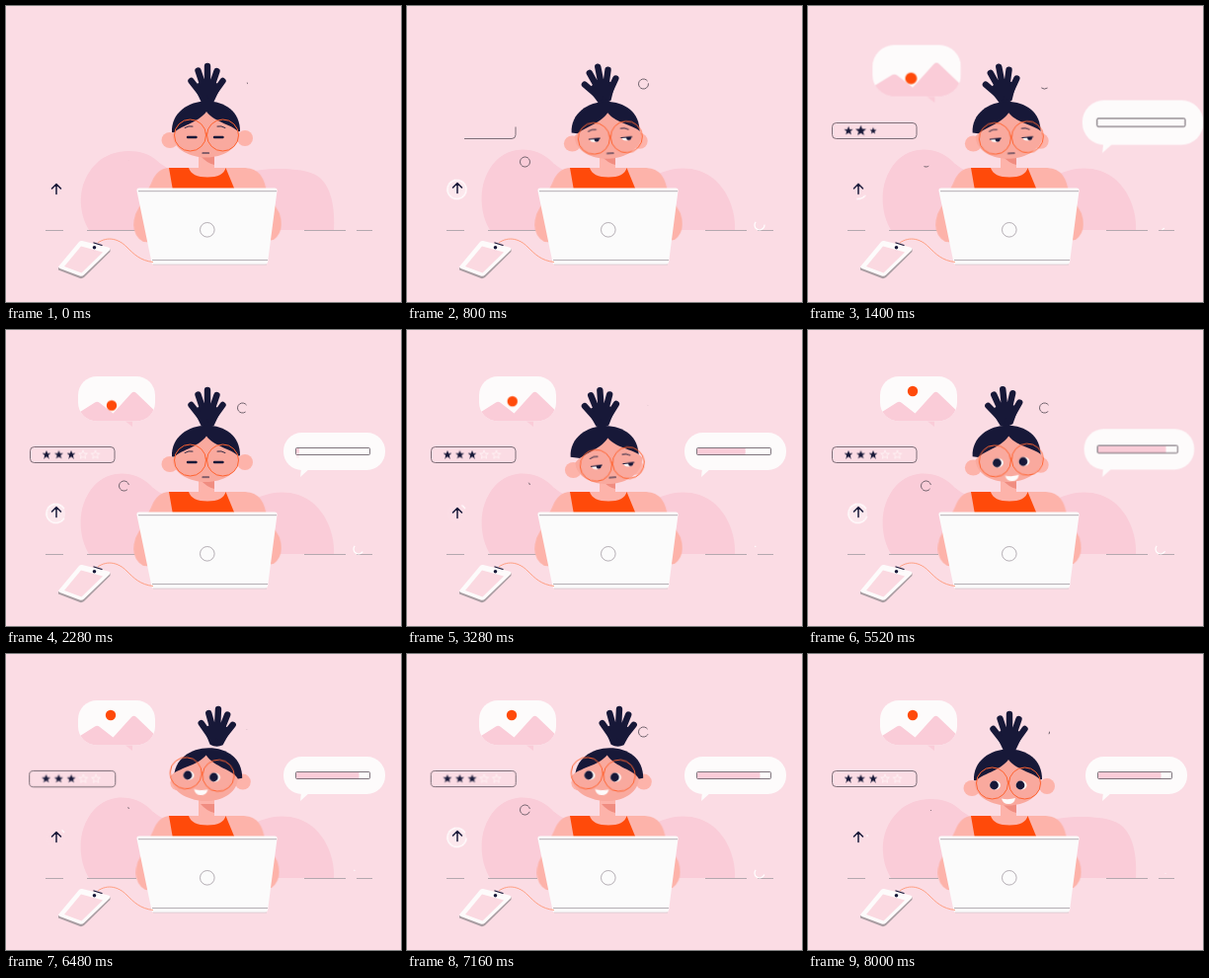
These frames come from a looping animation (400x300 px, 8040 ms). An HTML page without scripts:

```html
<!DOCTYPE html>
<html lang="en">
<head>
<meta charset="utf-8">
<title>Working at a laptop</title>
<style>
@property --yaw { syntax: "<number>"; inherits: true; initial-value: 0; }
@property --nod { syntax: "<number>"; inherits: true; initial-value: 0; }
@property --lift { syntax: "<number>"; inherits: true; initial-value: 0; }
@property --sway { syntax: "<number>"; inherits: true; initial-value: 0; }

html, body { margin: 0; width: 100%; height: 100%; overflow: hidden; background: #fbdce4; }
svg { display: block; width: 100vw; height: 100vh; }

.ink { fill: #171838; }
.line { fill: none; stroke: #171838; stroke-linecap: round; stroke-linejoin: round; }
.thin { fill: none; stroke: #5d525c; stroke-width: .8; }
.soft { fill: none; stroke: #a39ba2; stroke-width: .8; }
.pink { fill: #faccd8; }
.white { fill: #fdfbfb; }
.skin { fill: #fdb3aa; }
.face { fill: #f9a99e; }
.orange { fill: #ff4a0a; }

/* everything runs on one 8.04 s loop */
.a { animation: 8.04s ease-in-out infinite; }

/* head: yaw is left/right, nod is down, lift and sway move the bun */
.head { animation-name: pose; }
@keyframes pose {
  0%, 4% { --yaw: 0; --nod: 0; --lift: 0; --sway: 0; }
  8.7%, 20% { --yaw: .7; --nod: 2.5; --lift: 0; --sway: -11; }
  26%, 31% { --yaw: 0; --nod: 1; --lift: 0; --sway: 0; }
  36%, 44.8% { --yaw: 1.2; --nod: 5; --lift: 0; --sway: -4; }
  51%, 63.4% { --yaw: 0; --nod: 1.5; --lift: 4; --sway: 0; }
  67%, 71% { --yaw: .7; --nod: 1; --lift: 1; --sway: -6; }
  77%, 89.6% { --yaw: -1.1; --nod: -9; --lift: 5; --sway: 3; }
  96%, 100% { --yaw: 0; --nod: 0; --lift: 0; --sway: 0; }
}
.bun {
  transform-origin: 204px 99px;
  transform: translate(calc(var(--yaw) * -5px + var(--lift) * .7px), calc(var(--lift) * -1px)) rotate(calc(var(--sway) * 1deg));
}
.hair { transform: translate(calc(var(--yaw) * -2px), calc(var(--nod) * .15px)); }
.jaw {
  transform-origin: 203px 130px;
  transform: translate(calc(var(--yaw) * 1.5px), calc(var(--nod) * .5px)) rotate(calc(var(--yaw) * -3deg));
}
.looks {
  transform-origin: 203px 131px;
  transform: translate(calc(var(--yaw) * 4px), calc(var(--nod) * 1px)) rotate(calc(var(--yaw) * -4deg));
}
.earL { transform: translate(max(var(--yaw) * 2px, var(--yaw) * -8px), calc(var(--yaw) * 5px)); }
.earR { transform: translate(min(var(--yaw) * 2px, var(--yaw) * -9px), calc(var(--yaw) * 4px)); }

/* expressions */
.a.cut { animation-timing-function: step-end; }
.down { animation-name: down; }
.squint { animation-name: squint; }
.open { animation-name: open; }
.flat { animation-name: flat; }
.smile { animation-name: smile; }
.mouth { transform: translateY(calc(var(--nod) * -.9px)); }
@keyframes down { 0%, 23.5%, 47.5% { opacity: 1; } 5%, 34%, 62% { opacity: 0; } }
@keyframes squint { 0%, 23.5%, 47.5%, 100% { opacity: 0; } 5%, 34% { opacity: 1; } }
@keyframes open { 0%, 100% { opacity: 0; } 62% { opacity: 1; } }
@keyframes flat { 0% { opacity: 1; } 47.5%, 100% { opacity: 0; } }
@keyframes smile { 0%, 100% { opacity: 0; } 47.5% { opacity: 1; } }

.arms { transform-origin: 204px 0; animation-name: arms; }
@keyframes arms { 0%, 44.8% { transform: scaleX(.985); } 51%, 100% { transform: scaleX(.955); } }

.blobL { animation-name: blobL; }
.blobR { animation-name: blobR; }
@keyframes blobL {
  0%, 100% { d: path("M84 227C73 209 71 180 91 160C108 143 138 144 152 156C165 168 185 172 200 200V227Z"); }
  10%, 90% { d: path("M84 227C73 209 71 178 89 158C105 140 132 143 146 157C160 172 185 172 200 200V227Z"); }
}
@keyframes blobR {
  0%, 100% { d: path("M235 227V170C260 164 298 162 315 172C330 182 333 205 332 227Z"); }
  10%, 90% { d: path("M235 227V182C256 166 276 161 296 167C322 176 333 205 332 227Z"); }
}

/* small rings draw on and off */
.ring { fill: none; animation: ring 1.608s linear infinite; }
.late { animation-delay: -1.548s; }
@keyframes ring {
  0% { stroke-dasharray: 0 200; stroke-dashoffset: 0; }
  50% { stroke-dasharray: 100 200; stroke-dashoffset: 0; }
  78% { stroke-dasharray: 28 200; stroke-dashoffset: -40; }
  100% { stroke-dasharray: 0 200; stroke-dashoffset: -100; }
}
.glow { fill: #fff; animation: glow 1.608s linear infinite; }
@keyframes glow { 0%, 78%, 100% { opacity: 0; } 40%, 55% { opacity: .35; } }
.arrow { animation: bob 1.608s ease-in-out infinite; }
@keyframes bob { 0%, 100% { transform: none; } 50% { transform: translateY(-1px); } }

/* cards */
.photo { transform-origin: 125px 98px; animation-name: photo; }
@keyframes photo {
  0%, 11.5% { transform: scale(0); }
  16% { transform: scale(1.2); }
  20%, 100% { transform: none; }
}
.sun { animation-name: sun; }
@keyframes sun { 0%, 28% { transform: translate(1px, 14.5px); } 62.2%, 100% { transform: none; } }

.load { transform-origin: 298px 149px; animation-name: load; }
@keyframes load {
  0%, 13.5% { transform: scale(0); }
  17.5% { transform: scale(1.19); }
  21%, 65% { transform: none; }
  69.6% { transform: scale(1.09); }
  74%, 100% { transform: none; }
}
.fill { transform-origin: 294px 0; animation-name: fill; }
@keyframes fill { 0%, 24.9% { transform: scaleX(0); } 48.8%, 100% { transform: none; } }

.rate { transform-origin: 67px 126px; animation-name: rate; }
@keyframes rate {
  0%, 79% { transform: none; }
  84.4% { transform: scale(1.1); }
  90%, 100% { transform: none; }
}
.frame { stroke-dasharray: 100 200; animation-name: frame; }
@keyframes frame {
  0% { stroke-dasharray: 0 200; }
  6.2% { stroke-dasharray: 0 200; animation-timing-function: ease-in; }
  13.7%, 100% { stroke-dasharray: 100 200; }
}
.star { animation-name: star; animation-delay: calc(var(--i) * .1s); animation-fill-mode: backwards; }
@keyframes star {
  0%, 13.5% { transform: scale(0); }
  16% { transform: scale(1.25); }
  18%, 100% { transform: none; }
}
.stars { animation-name: stars; }
@keyframes stars { 0% { opacity: 0; } 13%, 100% { opacity: 1; } }
</style>
</head>
<body>
<svg viewBox="0 0 400 300" preserveAspectRatio="none">
  <defs>
    <path id="star" d="M0-4.6L1.15-1.5L4.4-1.4L1.85.6L2.75 3.7L0 1.9L-2.75 3.7L-1.85.6L-4.4-1.4L-1.15-1.5Z"/>
    <clipPath id="bubble"><rect x="73" y="47" width="78" height="45.5" rx="19"/></clipPath>
  </defs>

  <rect width="400" height="300" fill="#fbdce4"/>
  <path class="a pink blobL" d="M84 227C73 209 71 180 91 160C108 143 138 144 152 156C165 168 185 172 200 200V227Z"/>
  <path class="a pink blobR" d="M235 227V170C260 164 298 162 315 172C330 182 333 205 332 227Z"/>
  <path class="soft" d="M40 227.5H58M82 227.5H132M302 227.5H344M355 227.5H371"/>

  <!-- rings and arrow -->
  <circle class="ring late thin" r="5" pathLength="100" transform="translate(239.5 79) scale(1 -1) rotate(35)"/>
  <circle class="ring thin" r="5" pathLength="100" transform="translate(119.5 158) scale(1 -1) rotate(12)"/>
  <circle class="glow" cx="50.5" cy="186" r="9.7"/>
  <g stroke="#fff" stroke-width="1.2">
    <circle class="ring" r="9.7" pathLength="100" transform="translate(50.5 186) scale(1 -1) rotate(30)"/>
    <circle class="ring" r="5" pathLength="160" transform="translate(357 222) scale(1 -1) rotate(140)"/>
  </g>
  <path class="line arrow" stroke-width="1.5" d="M51 190.500V180.500M46.500 185L51 180.500L55.500 185"/>

  <!-- rating -->
  <g class="a rate">
    <path class="a thin frame" pathLength="100" d="M110 122.500V130.500Q110 134.500 106 134.500H28.500Q24.500 134.500 24.500 130.500V122.500Q24.500 118.500 28.500 118.500H106Q110 118.500 110 122.500Z"/>
    <g class="a cut stars">
      <g transform="translate(41 126.500)"><use href="#star" class="a star ink" style="--i:0"/></g>
      <g transform="translate(53.500 126.500)"><use href="#star" class="a star ink" style="--i:1"/></g>
      <g transform="translate(66 126.500)"><use href="#star" class="a star ink" style="--i:2"/></g>
      <g fill="none" stroke="#fff5f6" stroke-width=".8">
        <g transform="translate(78 126.500)"><use href="#star" class="a star" style="--i:3"/></g>
        <g transform="translate(90.500 126.500)"><use href="#star" class="a star" style="--i:4"/></g>
      </g>
    </g>
  </g>

  <!-- picture bubble -->
  <g class="a photo">
    <path class="pink" d="M119 91L128 98V91Z"/>
    <g clip-path="url(#bubble)">
      <rect class="white" x="73" y="47" width="78" height="46"/>
      <path class="pink" d="M70 86L90 73.500Q92.500 72 95 74L108.500 84.500L127 64Q129.500 61.500 132 64L155 86V95H70Z"/>
      <circle class="a orange sun" cx="106" cy="62" r="5.200"/>
    </g>
  </g>

  <!-- progress bubble -->
  <g class="a load">
    <rect class="white" x="281" y="104" width="103" height="38" rx="18.500"/>
    <path class="white" d="M299 140L298 149L308 140Z"/>
    <rect class="a pink fill" x="294" y="120" width="63.500" height="6.500"/>
    <rect class="thin" x="293.500" y="119.500" width="75" height="7" rx="1"/>
  </g>

  <!-- body -->
  <path class="a skin arms" d="M165 164H240C256 164 262 172 265 188L278 210Q284 228 272 237L250 240H150L138 239Q124 231 130 211L146 180Q152 164 165 164Z"/>
  <path class="orange" d="M165 164H185Q188 173.500 204 173.500Q220 173.500 222.500 164L232 187H169Z"/>
  <path class="skin" d="M195 148H211V166H195Z"/>
  <path fill="#f08d81" d="M197 152H211V161Q203 159 197 152Z"/>

  <!-- head -->
  <g class="a head">
    <g class="bun">
      <path class="ink" d="M190 81Q204 71 218 81L210.500 97Q204 100.500 197.500 97Z"/>
      <path class="line" stroke-width="6.400" d="M200 92L187.500 76M202 88L194.500 65.500M204 86V61M206 88L213.500 66M208 92L219.500 76"/>
    </g>
    <ellipse class="skin earL" cx="166" cy="136" rx="8.500" ry="8"/>
    <ellipse class="skin earR" cx="242" cy="134" rx="8" ry="8"/>
    <path class="ink hair" d="M168 128C167 108 185 96.500 203 96.500C222 96.500 237 107 237 127Q203 134 168 128Z"/>
    <path class="face jaw" d="M168.500 130C176 121 194 119 203 107C212 119 231 120 236.500 129C236 145 219 153.500 203 153.500C187 153.500 169 146 168.500 130Z"/>
    <g class="looks">
      <path class="a cut line flat" stroke-width=".9" d="M181 123.500Q185 121 189 122M214 122Q218 121 222 123.500"/>
      <path class="a cut line down" stroke-width="2.400" d="M184 133H192.500M211 133H219.500"/>
      <g class="a cut squint">
        <path class="white" d="M182 131.500H192Q191 134.800 187 134.800Q183 134.800 182 131.500ZM214.500 131.500H224.500Q223.500 134.800 219.500 134.800Q215.500 134.800 214.500 131.500Z"/>
        <path class="ink" d="M186.500 131H192Q191.700 134.600 189.200 134.600Q186.800 134.600 186.500 131ZM219 131H224.500Q224.200 134.600 221.700 134.600Q219.300 134.600 219 131Z"/>
        <path class="line" stroke-width="1.100" d="M181.500 131.500L192.500 131M214 131.500L225 131"/>
      </g>
      <g class="a cut open">
        <path class="white" d="M184 133A5.500 4.600 0 0 1 195 133A5.500 4.600 0 0 1 184 133ZM210.500 133A5.500 4.600 0 0 1 221.500 133A5.500 4.600 0 0 1 210.500 133Z"/>
        <circle class="ink" cx="188.500" cy="133" r="4.400"/>
        <circle class="ink" cx="215" cy="133" r="4.400"/>
      </g>
      <g class="mouth"><path class="a cut line flat" stroke-width="1.200" d="M199 149H205.500"/></g>
      <path class="a cut white smile" d="M196 146.500Q203 148 210 146Q209 152 203 152Q197.500 152 196 146.500Z"/>
      <g fill="none" stroke="#ff6330" stroke-width="1">
        <circle cx="186.500" cy="131" r="16"/>
        <circle cx="219.500" cy="131" r="16"/>
        <path d="M202 129.500Q203 128 204 129.500"/>
      </g>
    </g>
  </g>

  <!-- laptop -->
  <path fill="#fbfbfb" d="M135 184.500H272Q275 184.500 274.500 187.500L265 260Q264.500 262 262 262H150Q148 262 147.500 260L132.500 187.500Q132 184.500 135 184.500Z"/>
  <path class="soft" d="M134 187.700H274M148 257.500H265"/>
  <path d="M149 262H264" stroke="#d6cace" stroke-width=".8"/>
  <circle class="soft" cx="203.800" cy="226.800" r="7.300"/>

  <!-- phone and cable -->
  <path fill="#a99da2" d="M53 265V267.500L75 276Q77 276.500 79 275L105.500 249V246Z"/>
  <path class="white" d="M77 238L103.500 244.500Q107 245.500 104.500 248L79 272.500Q77 274.500 74.500 273.500L54.500 266Q52 265 54 263L74 239Q75.500 237.500 77 238Z"/>
  <path fill="#fbd9e1" d="M76 243.500L98 249.500L76.500 270.500L59 264Z"/>
  <path fill="none" stroke="#ff9878" stroke-width=".9" d="M93 240C103 233 114 236 122 244C130 252 136 258 149 259.500"/>
  <path class="line" stroke-width="1.300" d="M89 240L97 242.500"/>
  <circle class="ink" cx="89.500" cy="244.700" r="1.800"/>
</svg>
</body>
</html>
```
